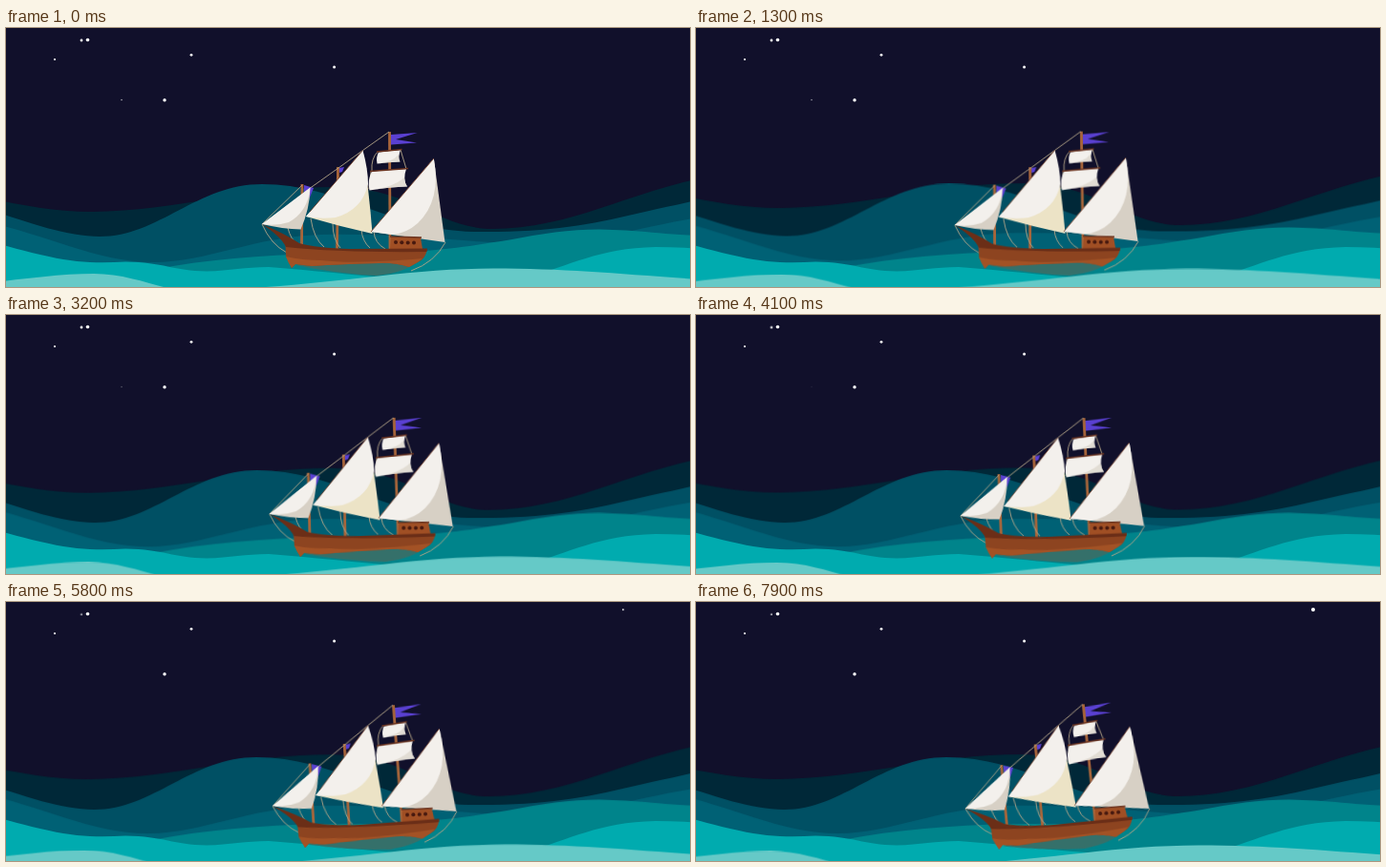
Animation, 716 px wide and 272 px high, one loop 8000 ms. Source, as an HTML page without scripts:

```html
<!DOCTYPE html>
<html lang="en">
<head>
<meta charset="utf-8">
<title>Ship at night</title>
<style>
  html, body { margin: 0; width: 100%; height: 100%; overflow: hidden; background: #11102b; }
  svg { display: block; width: 100vw; height: 100vh; }

  .wave { animation: settle 8s linear infinite; }
  .drift { animation: drift 8s linear infinite; }
  @keyframes settle {
    0% { transform: translate(0, 0); }
    16.25% { transform: translate(calc(var(--x) * .56), calc(var(--y) * .56)); }
    27.5% { transform: translate(calc(var(--x) * .78), calc(var(--y) * .78)); }
    40% { transform: translate(calc(var(--x) * .9), calc(var(--y) * .9)); }
    62.5% { transform: translate(calc(var(--x) * .96), calc(var(--y) * .96)); }
    100% { transform: translate(var(--x), var(--y)); }
  }
  @keyframes drift {
    to { transform: translate(var(--x), var(--y)); }
  }

  .ship { transform-origin: 364px 215.5px; animation: sail 8s linear infinite; }
  @keyframes sail {
    0% { transform: translate(0, 0) rotate(0deg); }
    16.25% { transform: translate(3px, 0) rotate(-.6deg); }
    27.5% { transform: translate(5.5px, 0) rotate(-1.2deg); }
    40% { transform: translate(8px, 0) rotate(-1.8deg); }
    62.5% { transform: translate(10.5px, 1.4px) rotate(-3.25deg); }
    82.5% { transform: translate(12.5px, 1.8px) rotate(-4.75deg); }
    100% { transform: translate(14.6px, 1.5px) rotate(-5.7deg); }
  }

  .fade { animation: fade 8s linear infinite; }
  .shrink { transform-origin: 79px 13px; animation: shrink 8s linear infinite; }
  .grow { transform-origin: 646px 8px; animation: grow 8s linear infinite; }
  @keyframes fade {
    0% { opacity: .8; }
    16% { opacity: .7; }
    27% { opacity: .25; }
    40% { opacity: .35; }
    55%, 100% { opacity: 0; }
  }
  @keyframes shrink {
    0%, 40% { transform: scale(1); }
    62% { transform: scale(.75); }
    79%, 100% { transform: scale(.6); }
  }
  @keyframes grow {
    0%, 68% { transform: scale(0); }
    78%, 100% { transform: scale(1); }
  }

  .rope { fill: none; stroke: #b3a487; stroke-width: .9; }
  .mast { fill: none; stroke: #a8653a; stroke-width: 2.8; }
  .yard { fill: none; stroke: #6b3420; stroke-width: 1.3; }
  .flag { fill: #5a40d2; }
  .light { fill: #f3f0ec; }
  .shade { fill: #d7d0c5; }
  .cream { fill: #ece3c6; }
</style>
</head>
<body>
<svg viewBox="0 0 716 272" preserveAspectRatio="none">
  <rect width="716" height="272" fill="#11102b"/>

  <g fill="#fff">
    <circle cx="51" cy="33" r="1.1"/>
    <circle class="shrink" cx="79" cy="13" r="1.4"/>
    <circle cx="85.5" cy="12.5" r="1.8"/>
    <circle cx="194" cy="28.3" r="1.4"/>
    <circle class="fade" cx="121" cy="75.5" r=".7"/>
    <circle cx="166" cy="75.7" r="1.7"/>
    <circle cx="343.6" cy="41" r="1.5"/>
    <circle class="grow" cx="646" cy="8" r="2"/>
  </g>

  <!-- far to near -->
  <path class="wave" style="--x:-4px;--y:-7px" fill="#002838"
    d="M-20 179C20 186 50 193 90 193C180 192 250 167 345 167C420 167 450 208 505 211C590 212 650 172 740 155V300H-20Z"/>
  <path class="wave" style="--x:-6px;--y:-1px" fill="#005064"
    d="M-20 190C25 205 65 219 98 219C160 219 200 164 268 164C350 164 400 212 490 214C565 215 610 207 660 195C690 188 715 183 740 177V300H-20Z"/>
  <path class="wave" style="--x:-6px;--y:-3px" fill="#006175"
    d="M-20 204C40 216 95 246 155 246C210 246 260 219 330 217C420 215 480 226 560 227C630 224 660 208 740 197V300H-20Z"/>
  <path class="wave" style="--x:0px;--y:-4px" fill="#00848b"
    d="M-20 272C60 272 130 258 175 250C230 241 290 237 350 237C430 238 480 230 527 222.5C560 216 590 211.5 621 211.5C660 212 690 217 740 219V300H-20Z"/>
  <path class="wave" style="--x:0px;--y:0px" fill="#00abaf"
    d="M-20 224C0 228 20 235 45 240C75 247 100 247 125 245.5C165 246 175 255 210 255.5C235 255 250 251 275 251C340 256 400 264 445 265C480 266 520 270 545 262C590 250 620 231 680 230C700 230 720 231 740 233V300H-20Z"/>

  <g class="ship">
    <!-- hull under water -->
    <path fill="#35706a" d="M303 249Q345 258 388 260Q418 257 431 245Z"/>

    <g class="mast">
      <path d="M310 164L309.5 228"/>
      <path d="M347.5 146L346.5 232"/>
      <path d="M401.5 109L402 232"/>
    </g>
    <path class="flag" d="M403 112L430.5 110L408 117L430 120.5L403 122.5Z"/>
    <path class="flag" d="M349 147L354 146L352 151L349 152Z"/>
    <path class="flag" d="M312 165L322 168L318 178L312 177Z"/>

    <g class="rope">
      <path d="M268 206L310 165M318.5 168L348 147L373.5 128.5L401 109"/>
      <path d="M268 206Q277 227 294 236"/>
      <path d="M460 225Q449 246 424 255"/>
      <path d="M295 210Q298 222 305 227M319 200Q322 221 333 230M342 205Q342 222 350 231"/>
      <path d="M372 212Q373 224 381 231M385 214Q386 226 397 232"/>
      <path d="M389 130Q382 137 383 150M413 128L419 148M382 151L380 169"/>
    </g>

    <!-- square sails -->
    <path class="light" d="M390 130.5L413 128Q410 135 412.5 140.5Q400 141 388.5 142.5Q387 136 390 130.5Z"/>
    <path class="shade" d="M388.5 142.5Q404 141 411 133Q410.5 137 412.5 140.5Q400 141 388.5 142.5Z" opacity=".6"/>
    <path class="light" d="M383 150.5L419 148Q415 159 420 166.5Q401 167 380.5 170.5Q378 160 383 150.5Z"/>
    <path class="shade" d="M380.5 170.5Q406 167 417 157Q417 162 420 166.5Q401 167 380.5 170.5Z" opacity=".6"/>
    <path class="yard" d="M388 130L414.5 127.5M381 150.5L421 147.5"/>

    <!-- triangular sails -->
    <path class="cream" d="M373.5 128.5Q380 170 383.5 216Q348 208 314 198Z"/>
    <path class="light" d="M373.5 128.5Q379 148 379 164Q373 191 345 199Q330 201 314 198Z"/>
    <path class="shade" d="M268 206L318.5 167.5Q318 190 308.5 211.5Q290 211 268 206Z"/>
    <path class="light" d="M268 206L318.5 167.5Q316 193 296 204Q284 208 268 206Z"/>
    <path class="shade" d="M447.8 137L459.5 225L382 214Z"/>
    <path class="light" d="M447.8 137Q456 181 431 205Q420 215 405 217L382 214Z"/>
    <path class="yard" d="M447.8 137L382 214M373.5 128.5L318 193" style="stroke-width:.8"/>

    <!-- hull -->
    <path fill="#a04f24" d="M403 219L434 220L436 232H402Z"/>
    <path class="yard" d="M402 219L435 220"/>
    <g fill="#47190f">
      <circle cx="408" cy="225" r="2"/>
      <circle cx="414.3" cy="225.2" r="2"/>
      <circle cx="420.7" cy="225.4" r="2"/>
      <circle cx="427" cy="225.6" r="2"/>
    </g>
    <path fill="#8d4420" d="M292.5 228Q330 234 441 232Q439 243 431 246L422 251Q405 246 390 247Q350 248 320 250L303 248L299 252Q295 243 293 240Z"/>
    <path fill="#a35225" d="M293 240Q310 244 330 244Q355 247 390 245Q415 244 436 242L431 246L422 251Q405 246 390 247Q350 248 320 250L303 248L299 252Q295 246 293 240Z"/>
    <path fill="#6b2e17" d="M268 206Q292 216 307 226Q325 231 360 232L441 231.5L440.5 235Q350 236 293 230Q288 219 268 206Z"/>
  </g>

  <g fill="#65c9c7">
    <path class="drift" style="--x:-14px;--y:3.5px"
      d="M-20 268C20 263 60 258 92 258C120 258 145 267 165 272L200 285H-20Z"/>
    <path class="drift" style="--x:16px;--y:3px"
      d="M200 283L272 272C350 267 430 252.5 510 252.5C590 252.5 650 259 740 265V300H200Z"/>
  </g>
</svg>
</body>
</html>
```
